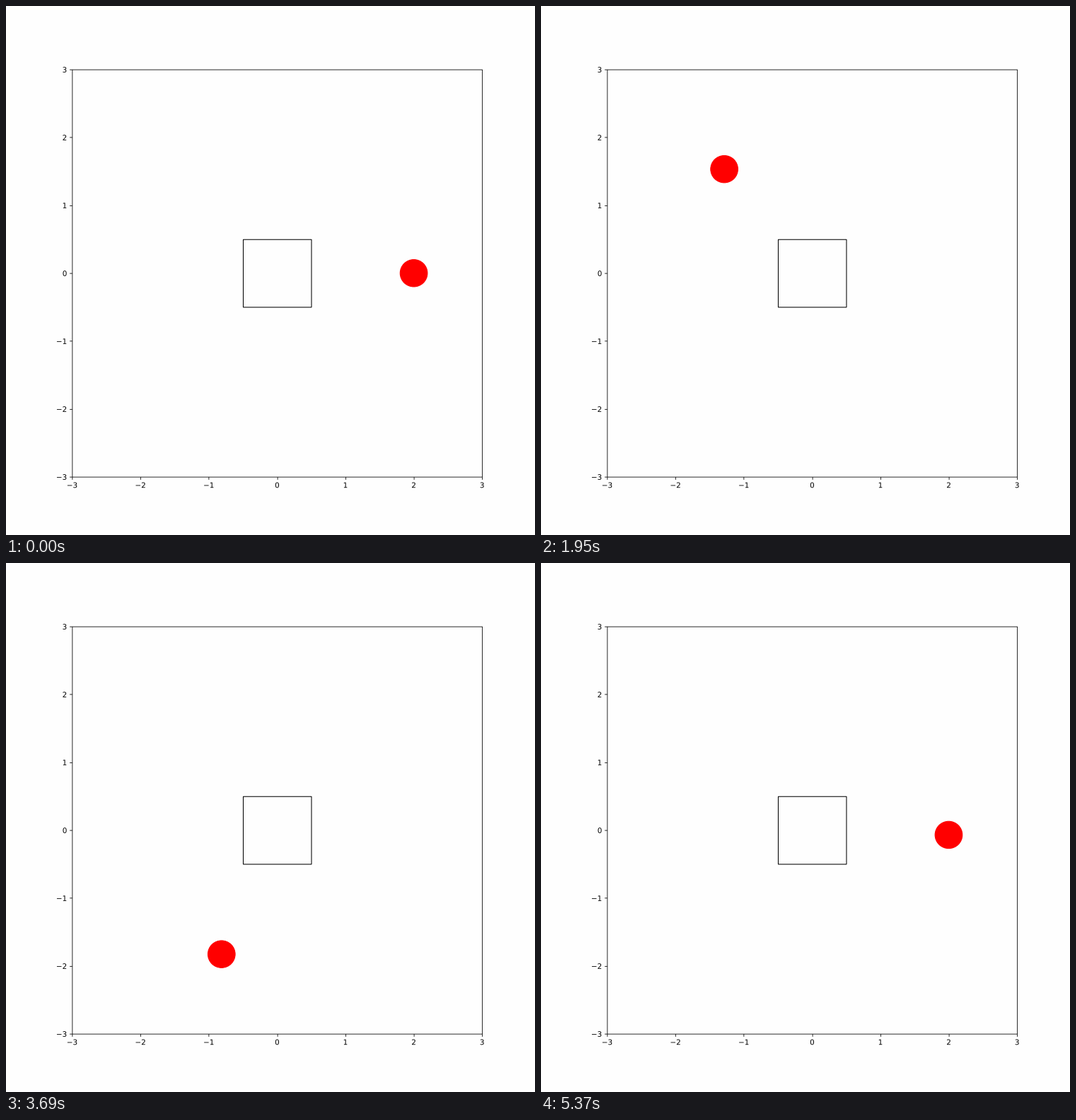
These frames come from a looping animation (748x748 px, 5.4 s). A matplotlib script:

```python
import numpy as np
import matplotlib.pyplot as plt
from matplotlib import patheffects
from matplotlib.animation import FuncAnimation
from matplotlib.patches import Ellipse, Rectangle

# The plot is laid out on a 1000-unit grid and shown at 748 pixels.
GRID = 1000
FRAMES, INTERVAL = 180, 30
LEFT, RIGHT, TOP, BOTTOM = 125, 900, 120, 890
UNIT_X, UNIT_Y = (RIGHT - LEFT) / 6, (BOTTOM - TOP) / 6
ORBIT, RADIUS = 2, 0.2
TICK, GAP = 5, 9.7
LINE = 0.8

fig = plt.figure(figsize=(10, 10), dpi=74.8, facecolor="#fefefe")
ax = fig.add_axes([0, 0, 1, 1], xlim=(0, GRID), ylim=(GRID, 0))
ax.axis("off")


def to_grid(x, y):
    return (LEFT + RIGHT) / 2 + x * UNIT_X, (TOP + BOTTOM) / 2 - y * UNIT_Y


def snap(v):
    return np.floor(v + 0.5) + 0.5


def box(x0, y0, x1, y1, width):
    x0, y0, x1, y1 = snap(np.array([x0, y0, x1, y1]))
    ax.add_patch(Rectangle((x0, y0), x1 - x0, y1 - y0, fill=False,
                           linewidth=width, snap=False))


def tick(xs, ys):
    ax.plot(xs, ys, color="black", linewidth=LINE, snap=False,
            solid_capstyle="butt")


def label(x, y, value, ha):
    # Drawing text as a path keeps its sub-pixel position.
    ax.text(x, y, f"{value}".replace("-", "\u2212"), ha=ha, va="baseline",
            fontsize=10, path_effects=[patheffects.Normal()])


box(LEFT, TOP, RIGHT, BOTTOM, LINE)
box(*to_grid(-0.5, 0.5), *to_grid(0.5, -0.5), 1)

for v in range(-3, 4):
    x, y = to_grid(v, v)
    left, bottom = snap(LEFT), snap(BOTTOM)
    tick([snap(x)] * 2, [bottom, bottom + TICK])
    tick([left, left - TICK], [snap(y)] * 2)
    label(x, BOTTOM + GAP + 11, v, "center")
    label(LEFT - GAP, y + 5.5, v, "right")

ball = ax.add_patch(Ellipse(to_grid(ORBIT, 0), 2 * RADIUS * UNIT_X,
                            2 * RADIUS * UNIT_Y, color="red"))


def update(i):
    angle = 2 * np.pi * i / FRAMES
    ball.center = to_grid(ORBIT * np.cos(angle), ORBIT * np.sin(angle))
    return (ball,)


anim = FuncAnimation(fig, update, frames=FRAMES, interval=INTERVAL,
                     repeat=True, repeat_delay=0)
plt.show()
```
